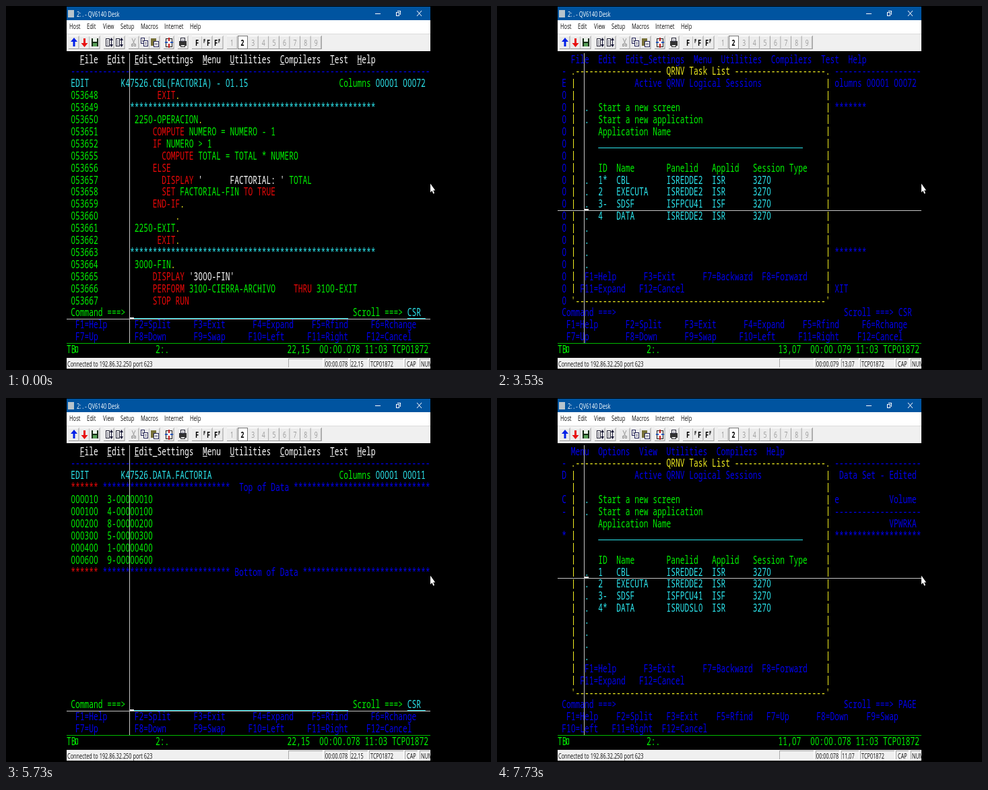
An HTML page with a canvas that plays this animation: 720 by 540 pixels, repeating every 8000 ms.

```html
<!DOCTYPE html>
<html lang="es">
<head>
<meta charset="utf-8">
<title>Terminal session</title>
<style>
html, body { margin: 0; width: 100%; height: 100%; overflow: hidden; background: #000; }
canvas { display: block; width: 720px; height: 540px; }
</style>
</head>
<body>
<canvas id="stage" width="720" height="540"></canvas>
<script>
const ctx = document.getElementById('stage').getContext('2d');
const LOOP = 8000, CELL_W = 6.75, CELL_H = 17.9, TALL = 1.5;
const COLORS = { g: '#00f400', r: '#ee0808', c: '#2ce6ee', b: '#0000f0', w: '#ffffff', y: '#f0ec20' };
const colX = c => 89.5 + CELL_W * (c - 1);
const rowBottom = r => 70 + CELL_H * r;
const USER = 'K47526';

// ---------- drawing helpers ----------
function rect(x, y, w, h, color) {
  ctx.fillStyle = color;
  ctx.fillRect(x, y, w, h);
}
function poly(points, color) {
  ctx.fillStyle = color;
  ctx.beginPath();
  points.forEach(([x, y]) => ctx.lineTo(x, y));
  ctx.fill();
}
function frame(x, y, w, h, color) {
  ctx.strokeStyle = color;
  ctx.lineWidth = 1;
  ctx.strokeRect(x + .5, y + .5, w - 1, h - 1);
}
function line(x1, y1, x2, y2, color) {
  ctx.strokeStyle = color;
  ctx.lineWidth = 1;
  ctx.beginPath();
  ctx.moveTo(x1, y1);
  ctx.lineTo(x2, y2);
  ctx.stroke();
}
function label(text, x, y, color = '#111', size = 10.5, style = '') {
  ctx.save();
  ctx.translate(x, y);
  ctx.scale(.72, 1);
  ctx.font = `${style} ${size}px "Open Sans", sans-serif`;
  ctx.fillStyle = color;
  ctx.fillText(text, 0, 0);
  ctx.restore();
}
// Terminal text: one glyph per cell, tall and narrow. Zeros use a face without a slash.
const MONO = '11.25px "Noto Sans Mono", monospace';
const PLAIN_ZERO = '11.25px "Noto Sans", sans-serif';
function glyphs(text, x, baseline, color) {
  ctx.save();
  ctx.fillStyle = color;
  ctx.textAlign = 'center';
  [...text].forEach((ch, i) => {
    if (ch === ' ') return;
    ctx.font = ch === '0' ? PLAIN_ZERO : MONO;
    ctx.setTransform(1, 0, 0, TALL, x + (i + .5) * CELL_W, baseline);
    ctx.fillText(ch, 0, 0);
  });
  ctx.restore();
}
let dimmed = false;
function put(row, col, text, color = 'g') {
  glyphs(text, colX(col), rowBottom(row) - 3.4, COLORS[dimmed ? 'b' : color]);
}
function underline(row, col, count, color, lift = 1) {
  if (!dimmed) rect(colX(col), Math.round(rowBottom(row) - lift), count * CELL_W, 1, COLORS[color]);
}
// items: "col text" pairs
function putAll(row, color, items) {
  items.forEach(item => {
    const gap = item.indexOf(' ');
    put(row, +item.slice(0, gap), item.slice(gap + 1), color);
  });
}

// ---------- terminal screens ----------
function menuBar(items) {
  putAll(1, 'w', items);
  items.forEach(item => underline(1, parseInt(item), 1, 'w', 2));
  put(2, 2, '-'.repeat(79), 'b');
}
function commandRow(scroll) {
  put(22, 2, 'Command ===>');
  put(22, 64, 'Scroll ===>');
  put(22, 76, scroll, 'c');
  underline(22, 15, 48, 'c');
  underline(22, 76, 4, 'c');
}
function editor(dataset, lastColumn) {
  menuBar(['4 File', '10 Edit', '16 Edit_Settings', '31 Menu', '37 Utilities', '48 Compilers', '59 Test', '65 Help']);
  put(3, 2, 'EDIT', 'c');
  put(3, 13, USER + dataset, 'c');
  put(3, 61, 'Columns');
  put(3, 69, '00001 ' + lastColumn, 'c');
  commandRow('CSR');
  putAll(23, 'b', ['3 F1=Help', '16 F2=Split', '29 F3=Exit', '42 F4=Expand', '55 F5=Rfind', '68 F6=Rchange']);
  putAll(24, 'b', ['3 F7=Up', '16 F8=Down', '29 F9=Swap', '41 F10=Left', '54 F11=Right', '67 F12=Cancel']);
}

const STARS = '*'.repeat(54);
const PROGRAM = [
  '      EXIT.', STARS, ' 2250-OPERACION.', '     COMPUTE NUMERO = NUMERO - 1', '     IF NUMERO > 1',
  '       COMPUTE TOTAL = TOTAL * NUMERO', '     ELSE', "       DISPLAY '      FACTORIAL: ' TOTAL",
  '       SET FACTORIAL-FIN TO TRUE', '     END-IF.', '          .', ' 2250-EXIT.', '      EXIT.', STARS,
  ' 3000-FIN.', "     DISPLAY '3000-FIN'", '     PERFORM 3100-CIERRA-ARCHIVO    THRU 3100-EXIT', '     STOP RUN'
];
const KEYWORD = /^(EXIT|COMPUTE|IF|ELSE|DISPLAY|SET|TO|TRUE|END-IF|PERFORM|THRU|STOP|RUN)$/;
function tokenColor(token) {
  if (token === STARS) return 'c';
  if (token === '.') return 'y';
  if (token[0] === "'") return 'w';
  return KEYWORD.test(token) ? 'r' : 'g';
}
function codeScreen() {
  editor('.CBL(FACTORIA) - 01.15', '00072');
  PROGRAM.forEach((text, i) => {
    const number = 53648 + i + (i > 4 ? 2 : 0);
    put(4 + i, 2, '0' + number);
    for (const m of text.matchAll(/'[^']*'|\.|[^\s.]+/g)) put(4 + i, 15 + m.index, m[0], tokenColor(m[0]));
  });
}
function dataScreen() {
  editor('.DATA.FACTORIA', '00011');
  ['000010 3', '000100 4', '000200 8', '000300 5', '000400 1', '000600 9'].forEach((s, i) => {
    const [number, id] = s.split(' ');
    put(5 + i, 2, `${number}  ${id}-00${number}`);
  });
  [[4, 39, 'Top of Data'], [11, 38, 'Bottom of Data']].forEach(([row, col, text]) => {
    const next = col + text.length + 1;
    put(row, 2, '******', 'r');
    put(row, 9, '*'.repeat(28), 'b');
    put(row, col, text, 'b');
    put(row, next, '*'.repeat(81 - next), 'b');
  });
}
function listScreen() {
  menuBar(['4 Menu', '10 Options', '19 View', '25 Utilities', '36 Compilers', '47 Help']);
  put(3, 2, `DSLIST - Data Sets Matching ${USER}.DATA.FACTORIA`, 'c');
  put(3, 63, 'Data Set - Edited', 'w');
  put(5, 2, 'Command - Enter "/" to select action', 'b');
  put(5, 56, 'Message', 'w');
  put(5, 74, 'Volume', 'b');
  put(6, 2, '-'.repeat(79), 'b');
  put(7, 11, USER + '.DATA.FACTORIA');
  put(7, 56, 'Edited', 'w');
  put(7, 74, 'VPWRKA', 'b');
  put(8, 2, '*'.repeat(29) + ' End of Data Set list ' + '*'.repeat(28), 'b');
  commandRow('PAGE');
  putAll(23, 'b', ['3 F1=Help', '14 F2=Split', '25 F3=Exit', '36 F5=Rfind', '47 F7=Up', '58 F8=Down', '69 F9=Swap']);
  putAll(24, 'b', ['2 F10=Left', '13 F11=Right', '24 F12=Cancel']);
}
function taskList(background, sessions) {
  dimmed = true;
  background();
  dimmed = false;
  rect(colX(3), rowBottom(1) + 1, 59 * CELL_W, 20 * CELL_H, '#000');
  put(2, 4, '.' + '-'.repeat(19) + ' QRNV Task List ' + '-'.repeat(20) + '.', 'y');
  for (let r = 3; r <= 20; r++) {
    [4, 60].forEach(c => rect(Math.round(colX(c) + 3), Math.round(rowBottom(r) - 16), 1, 14, COLORS.y));
  }
  put(21, 4, "'" + '-'.repeat(55) + "'", 'y');
  put(3, 18, 'Active QRNV Logical Sessions', 'b');
  ['Start a new screen', 'Start a new application', 'Application Name'].forEach((s, i) => put(5 + i, 10, s));
  underline(8, 10, 45, 'c', 3);
  putAll(10, 'g', ['10 ID', '14 Name', '25 Panelid', '35 Applid', '44 Session Type']);
  [5, 6, 11, 12, 13, 14, 15, 16, 17, 18].forEach(r => put(r, 7, '.', 'c'));
  sessions.forEach(([id, name, panel, app], i) =>
    putAll(11 + i, 'c', ['10 ' + id, '14 ' + name, '25 ' + panel, '35 ' + app, '44 3270']));
  putAll(19, 'b', ['7 F1=Help', '20 F3=Exit', '33 F7=Backward', '46 F8=Forward']);
  putAll(20, 'b', ['6 F11=Expand', '19 F12=Cancel']);
}
const sessionRows = (first, last, lastPanel) => [
  [first, 'CBL', 'ISREDDE2', 'ISR'], ['2', 'EXECUTA', 'ISREDDE2', 'ISR'],
  ['3-', 'SDSF', 'ISFPCU41', 'ISF'], [last, 'DATA', lastPanel, 'ISR']
];
const codeTasks = () => taskList(codeScreen, sessionRows('1*', '4', 'ISREDDE2'));
const listTasks = () => taskList(listScreen, sessionRows('1', '4*', 'ISRUDSL0'));

// ---------- window chrome ----------
function arrow(x, color, dir) {
  poly([[0, -7], [5, -1], [1.5, -1], [1.5, 6], [-1.5, 6], [-1.5, -1], [-5, -1]].map(([a, b]) => [x + a, 54 + b * dir]), color);
}
function page(x, y, w, h, ink = '#223') {
  rect(x, y, w, h, '#fff');
  frame(x, y, w, h, ink);
  for (let i = 3; i < h - 2; i += 2) rect(x + 2, y + i, w - 4, 1, '#667');
}
function toolbar() {
  rect(90, 41, 540, 26, '#f0f0f0');
  rect(90, 41, 540, 1, '#dcdcdc');
  const button = x => {
    rect(x, 44, 15, 20, '#ececec');
    rect(x + 14.5, 44, 1, 20, '#999');
    rect(x, 63, 15, 1, '#999');
    rect(x, 44, 15, 1, '#fff');
  };
  [93, 109, 124, 145, 161, 182, 198, 213, 234, 255, 276, 291, 307].forEach(button);
  arrow(101, '#0020e8', 1);
  arrow(116.5, '#e81010', -1);
  rect(127, 48, 10, 12, '#162c16');
  rect(129, 48, 6, 5, '#e8f4e8');
  rect(129, 55, 6, 5, '#58a058');
  [148, 163].forEach(x => {
    page(x, 48, 6, 12);
    line(x + 8.5, 48, x + 8.5, 60, '#113');
    poly([[x + 6, 51], [x + 8.5, 47], [x + 11, 51]], '#113');
    poly([[x + 6, 57], [x + 8.5, 61], [x + 11, 57]], '#113');
  });
  line(187, 48, 191, 57, '#999');
  line(192, 48, 188, 57, '#999');
  frame(186, 56, 3, 4, '#999');
  frame(190, 56, 3, 4, '#999');
  page(200, 47, 6, 9, '#225');
  page(204, 51, 7, 9, '#225');
  rect(215, 48, 8, 11, '#777038');
  page(219, 52, 8, 9, '#225');
  frame(237, 48, 10, 13, '#222');
  rect(241, 47, 2, 15, '#c22');
  rect(236, 53, 12, 2, '#25b');
  rect(240, 52, 4, 4, '#fff');
  rect(257, 52, 11, 7, '#333');
  page(259, 47, 7, 6);
  rect(259, 57, 7, 4, '#ddd');
  frame(259, 57, 7, 4, '#333');
  label('F', 281, 59, '#000', 13, 'bold');
  label('F', 293, 55, '#000', 8, 'bold');
  label('F', 298, 59, '#000', 13, 'bold');
  label('F', 309, 59, '#000', 13, 'bold');
  label('F', 315, 55, '#000', 8, 'bold');
  for (let i = 1; i <= 9; i++) {
    const x = 328 + (i - 1) * 15.6, active = i === 2;
    button(x);
    if (active) {
      rect(x, 44, 15, 20, '#fff');
      frame(Math.round(x), 44, 15, 20, '#777');
    }
    label(i, x + 5, 59, active ? '#000' : '#9a9a9a', 12, active ? 'bold' : '');
  }
  rect(468, 44, 1, 20, '#aaa');
}
function windowChrome() {
  rect(90, 1, 540, 20, '#0054a0');
  rect(92, 6, 9, 11, '#b8c4cc');
  label('2: . - QV6140 Desk', 105, 16, '#fff');
  rect(548, 11, 8, 1, '#fff');
  frame(579, 9, 5, 6, '#fff');
  line(581, 7.5, 586, 7.5, '#fff');
  line(585.5, 7, 585.5, 13, '#fff');
  line(610, 7, 617, 15, '#fff');
  line(617, 7, 610, 15, '#fff');
  rect(90, 21, 540, 20, '#fff');
  [['Host', 94], ['Edit', 120], ['View', 144], ['Setup', 170], ['Macros', 200], ['Internet', 235], ['Help', 273]]
    .forEach(([text, x]) => label(text, x, 34));
  toolbar();
}
function statusBars(position, elapsed) {
  const base = 514.5;
  rect(90, 500, 540, 1, '#00b800');
  glyphs('TB', 90, base, COLORS.g);
  frame(103, 505, 4, 9, COLORS.g);
  glyphs('2:.', 222, base, COLORS.g);
  glyphs(position, 417.5, base, COLORS.g);
  glyphs(`00:0${elapsed} 11:03 TCP01872`, 465, base, COLORS.g);

  rect(90, 522, 540, 16, '#f0f0f0');
  [[419, 52], [473, 36], [511, 27], [539, 52], [592, 20], [614, 16]].forEach(([x, w]) => {
    rect(x, 523, w, 1, '#aaa');
    rect(x, 523, 1, 13, '#aaa');
    rect(x + w - 1, 523, 1, 13, '#fff');
  });
  ctx.save();
  ctx.beginPath();
  ctx.rect(90, 522, 540, 16);
  ctx.clip();
  [['Connected to 192.86.32.250 port 623', 91], ['00:0' + elapsed, 474], [position, 512],
    ['TCP01872', 541], ['CAP', 595], ['NUM', 616]].forEach(([text, x]) => label(text, x, 534.5, '#111', 10.2));
  ctx.restore();
}
function crosshair(row, col, cursor) {
  const x = Math.round(colX(col)) - 1, y = Math.round(rowBottom(row));
  rect(x, 70, 1, 430, '#c4c4c4');
  rect(90, y, 540, 1, '#c4c4c4');
  if (cursor) rect(x + 1, y - 2, 6, 2, '#f0f0f0');
}
function pointer() {
  poly([[0, 0], [0, 13], [2.4, 10.6], [4.3, 15], [6, 14.2], [4.2, 10], [7.2, 10]].map(([x, y]) => [630 + x, 263.5 + y]), '#fff');
}

// ---------- timeline: start, screen, crosshair row and column, cursor, status ----------
const STEPS = [
  [0, codeScreen, 22, 15, true, '22,15', '0.078'],
  [2930, codeTasks, 11, 7, true, '22,15', '0.078'],
  [3330, codeTasks, 11, 7, true, '11,07', '0.079'],
  [3470, codeTasks, 12, 7, true, '12,07', '0.079'],
  [3530, codeTasks, 13, 7, true, '13,07', '0.079'],
  [4130, dataScreen, 22, 15, false, '13,07', '0.079'],
  [4670, dataScreen, 22, 15, false, '22,15', '0.078'],
  [5730, dataScreen, 22, 15, true, '22,15', '0.078'],
  [6330, listScreen, 7, 2, false, '22,15', '0.078'],
  [6730, listScreen, 7, 2, false, '07,02', '0.109'],
  [7330, listTasks, 11, 7, true, '07,02', '0.109'],
  [7730, listTasks, 11, 7, true, '11,07', '0.078']
];
function draw([, screen, row, col, cursor, position, elapsed]) {
  rect(0, 0, 720, 540, '#000');
  windowChrome();
  screen();
  statusBars(position, elapsed);
  crosshair(row, col, cursor);
  pointer();
}

const start = performance.now();
let shown = null;
function tick() {
  const t = (performance.now() - start) % LOOP;
  const step = STEPS.findLast(s => s[0] <= t);
  if (step !== shown) draw(shown = step);
  requestAnimationFrame(tick);
}
tick();
</script>
</body>
</html>
```
